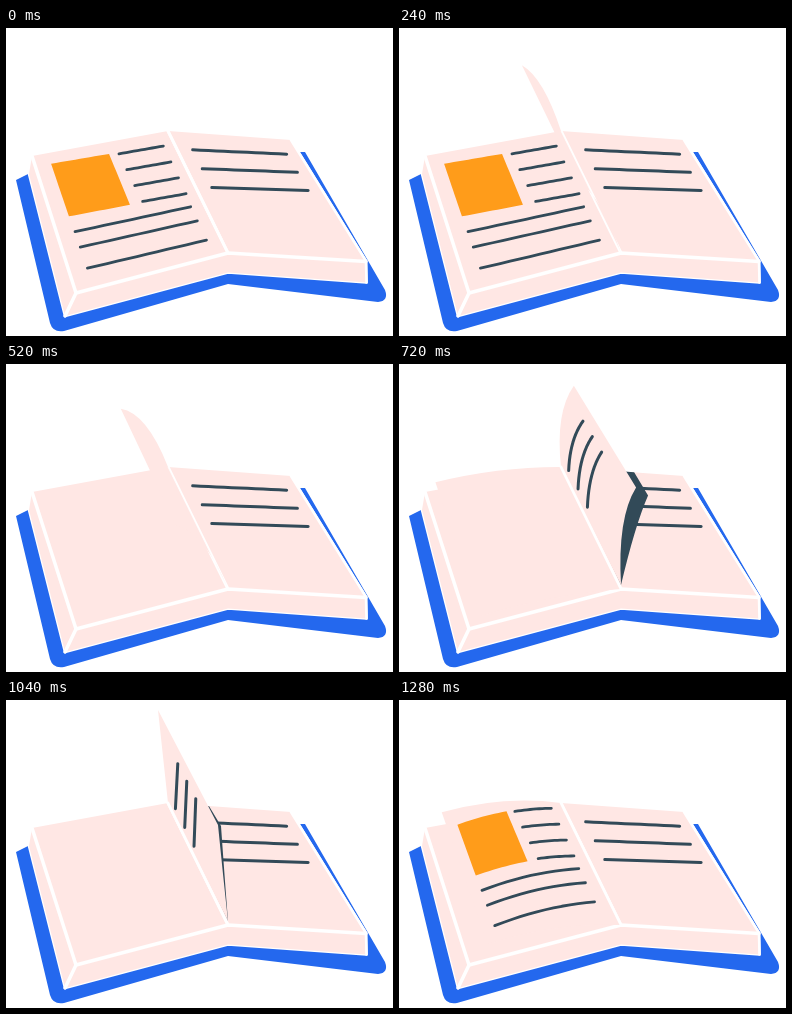
An HTML page with a canvas for the animation above (1.32 s loop, 387 by 308 pixels).

```html
<!DOCTYPE html>
<html>
<head>
<meta charset="utf-8">
<style>
  html, body { margin: 0; width: 100%; height: 100%; overflow: hidden; background: #fff; }
  canvas { display: block; }
</style>
</head>
<body>
<canvas id="stage" width="387" height="308"></canvas>
<script>
const ctx = document.getElementById('stage').getContext('2d');
const PINK = '#ffe7e4', INK = '#324a58', BLUE = '#2468ee', ORANGE = '#ff9c1a';
const LOOP = 1320, STEP = 40;
const STARTS = [10, 275, 560, 860];
const RISE_TIME = 180, TURN_TIME = 520, VISIBLE_TIME = 460;
const SPINE_TOP = [162, 103], SPINE_LOW = [222, 225];

// Outer top corner of a page, and the vector down its outer edge
const RIGHT = { corner: [285, 112], edge: [73, 121] };
const UP = { corner: [152, 10], edge: [60, 115] };
const LEFT = { corner: [26, 128], edge: [44, 137] };
const RISE = { from: RIGHT, to: UP, lift: 11, shrink: 28, topBend: [-24, -27], lowBend: [-22, -40] };
const FALL = { from: UP, to: LEFT, lift: 0, shrink: 6, topBend: [3, -31], lowBend: [3, -31] };

const add = (a, b, k = 1) => [a[0] + b[0] * k, a[1] + b[1] * k];
const mix = (a, b, f) => [a[0] + (b[0] - a[0]) * f, a[1] + (b[1] - a[1]) * f];
const curve = (a, c, b, f) => mix(mix(a, c, f), mix(c, b, f), f);

function pose(t) {
  const rising = t <= RISE_TIME;
  const move = rising ? RISE : FALL;
  const f = rising
    ? (t / RISE_TIME) ** 1.6
    : 1 - (1 - (t - RISE_TIME) / (TURN_TIME - RISE_TIME)) ** 1.65;
  const hump = Math.sin(Math.PI * f);
  const top = add(mix(move.from.corner, move.to.corner, f), [0, -move.lift], hump);
  const low = add(top, add(mix(move.from.edge, move.to.edge, f), [0, -move.shrink], hump));
  return {
    rising, f, hump, top, low,
    topBend: add(mix(SPINE_TOP, top, .5), move.topBend, hump),
    lowBend: add(mix(SPINE_LOW, low, .5), move.lowBend, hump)
  };
}

// u runs from the spine outwards, v from top to bottom
const surface = (p, u, v) =>
  mix(curve(SPINE_TOP, p.topBend, p.top, u), curve(SPINE_LOW, p.lowBend, p.low, u), v);

const FLAT_RIGHT = pose(0), FLAT_LEFT = pose(TURN_TIME);

function polygon(points, fill) {
  ctx.beginPath();
  for (const p of points) ctx.lineTo(...p);
  ctx.closePath();
  ctx.fillStyle = fill;
  ctx.fill();
}

function line(points, color, width) {
  ctx.beginPath();
  for (const p of points) ctx.lineTo(...p);
  ctx.strokeStyle = color;
  ctx.lineWidth = width;
  ctx.stroke();
}

const drawSpine = width => line([SPINE_TOP, SPINE_LOW], '#fff', width);

// Points along a straight run of page coordinates
const run = (at, a, b) => Array.from({ length: 13 }, (_, i) => at(...mix(a, b, i / 12)));

function drawBook() {
  ctx.fillStyle = '#fff';
  ctx.fillRect(0, 0, 387, 308);
  ctx.beginPath();
  ctx.moveTo(10, 152);
  ctx.lineTo(22, 146);
  ctx.lineTo(100, 200);
  ctx.lineTo(294, 124);
  ctx.lineTo(299, 124);
  ctx.lineTo(379, 262);
  ctx.quadraticCurveTo(383, 273, 372, 274);
  ctx.lineTo(222, 256);
  ctx.lineTo(58, 303);
  ctx.quadraticCurveTo(47, 305, 44, 295);
  ctx.closePath();
  ctx.fillStyle = BLUE;
  ctx.fill();

  const outline = [LEFT.corner, SPINE_TOP, RIGHT.corner, [360, 233], [360.5, 254.5],
    [222, 244.5], [59, 288], [23, 146]];
  line([...outline, outline[0]], '#fff', 2.6);
  polygon(outline, PINK);
  line([LEFT.corner, FLAT_LEFT.low, SPINE_LOW, [360, 233.5]], '#fff', 3.5);
  line([FLAT_LEFT.low, [59, 288]], '#fff', 3.5);
  line([RIGHT.corner, [360, 233], [360.5, 254.5]], '#fff', 2.6);
}

function drawArticle(p) {
  const slip = Math.min(1, 8 * (1 - p.f));
  const at = (u, v) => surface(p, u + .03 * slip, v + (.11 * u - .06) * slip);
  const picture = [[.886, .078], [.467, .087], [.466, .482], [.886, .467]];
  polygon(picture.flatMap((c, i) => run(at, c, picture[(i + 1) % 4])), ORANGE);
  for (let i = 0; i < 4; i++)
    line(run(at, [.4 - .008 * i, .1 + .126 * i], [.08, .106 + .129 * i]), INK, 2.8);
  for (const v of [.582, .696, .852])
    line(run(at, [.88, v], [.09, v + .014]), INK, 2.8);
}

function drawText(p) {
  const at = (u, v) => surface(p, u, v);
  const slip = p.f ** 2;
  for (let i = 0; i < 3; i++)
    line(run(at, [.128, .145 + .155 * i], [.892 - .1 * slip, .125 + .15 * i + .17 * slip]), INK, 3);
}

function drawShadow(p) {
  const corner = add(add(p.low, [3, 1]), [34, 26], p.hump ** 2);
  const rise = corner[1] - 103 - .06 * (corner[0] - 162);
  const top = add(corner, [-.6, -1], Math.max(0, rise));
  const bend = add(mix(SPINE_LOW, corner, .5), [1, -33], p.hump);
  ctx.beginPath();
  ctx.moveTo(167, 103);
  ctx.lineTo(...top);
  ctx.lineTo(...corner);
  ctx.quadraticCurveTo(...bend, 222, 221);
  ctx.fillStyle = INK;
  ctx.fill();
}

function drawPage(p) {
  ctx.beginPath();
  ctx.moveTo(...SPINE_TOP);
  ctx.quadraticCurveTo(...p.topBend, ...p.top);
  ctx.lineTo(...p.low);
  ctx.quadraticCurveTo(...p.lowBend, 222, p.rising ? 221 : 225);
  ctx.fillStyle = PINK;
  ctx.fill();
}

function draw(time) {
  const ages = STARTS.map(start => time - start);
  let covered = false;
  ctx.lineCap = ctx.lineJoin = 'round';
  drawBook();
  if (ages[0] < VISIBLE_TIME) drawArticle(FLAT_LEFT);
  drawText(FLAT_RIGHT);
  drawSpine(3);
  ages.forEach((t, i) => {
    if (t <= 0 || t >= VISIBLE_TIME) return;
    const p = pose(t);
    if (p.rising) drawShadow(p);
    drawPage(p);
    if (p.rising) drawText(p);
    else if (i === STARTS.length - 1) drawArticle(p);
    covered ||= !p.rising && p.f < .8;
  });
  drawSpine(covered ? .7 : 2.8);
}

const origin = performance.now();
function tick() {
  const time = (performance.now() - origin) % LOOP;
  draw(Math.floor(time / STEP) * STEP);
  requestAnimationFrame(tick);
}
tick();
</script>
</body>
</html>
```
